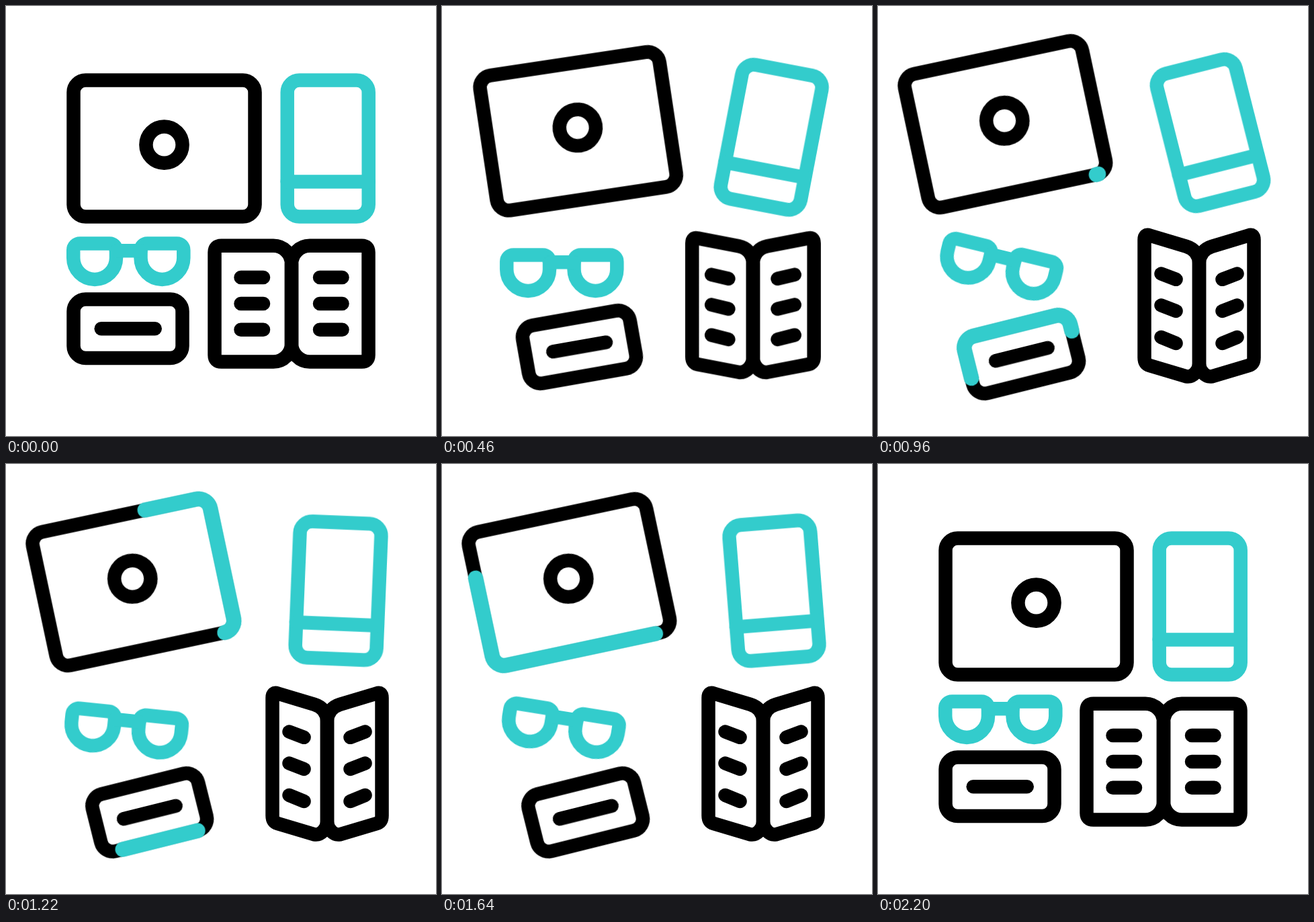
Recreate the animation shown at these times as an HTML page without scripts. Size 640 by 640 pixels, loop 2.4 s.

```html
<!DOCTYPE html>
<html lang="en">
<head>
<meta charset="utf-8">
<title>Desk items</title>
<style>
@property --tail { syntax: "<length>"; inherits: false; initial-value: 0px; }
@property --head { syntax: "<length>"; inherits: false; initial-value: 0px; }

html, body { margin: 0; width: 100%; height: 100%; overflow: hidden; background: #fff; }
svg { display: block; width: 100vw; height: 100vh; }

svg {
  --loop: 2400ms infinite;
  --soft: cubic-bezier(.333, 0, .667, 1);
  --ink: #000;
  --teal: #33cccc;
  fill: none;
  stroke: var(--ink);
  stroke-width: 20.5;
  stroke-linecap: round;
  stroke-linejoin: round;
}
.teal { stroke: var(--teal); }

/* Each item drifts out, waits, and drifts back. */
.item {
  --r: 0deg;
  animation: move var(--loop) cubic-bezier(.3, 0, .7, 1);
}
@keyframes move {
  0%, 8.333%, 91.667%, 100% { transform: translate(0px, 0px) rotate(0deg); }
  25%, 82.5% { transform: translate(var(--x), var(--y)) rotate(var(--r)); }
}
.laptop  { --x: -46.1px; --y: -36px; --r: -12deg; transform-origin: 235.5px 212px; }
.phone   { --x: 15.3px; --y: -23.4px; }
.glasses { --x: -5.6px; --y: 24px; }
.card    { --x: 32.2px; --y: 38.3px; --r: -14deg; transform-origin: 181.5px 480.3px; }
.book    { --x: 35.5px; --y: 20px; }

.swing { transform-origin: 479.2px 212px; animation: swing var(--loop) var(--soft); }
@keyframes swing {
  0%, 8.333%, 91.667%, 100% { transform: rotate(0deg); }
  25%, 58.333% { transform: rotate(15deg); }
  41.667%, 75% { transform: rotate(-15deg); }
}

.nod { transform-origin: 246px 395px; animation: nod var(--loop) var(--soft); }
@keyframes nod {
  0%, 25%, 58.333%, 91.667%, 100% { transform: rotate(0deg); }
  41.667%, 75% { transform: rotate(14deg); }
}

/* The book halves fold around the spine at x = 0. */
.spine { animation: spine var(--loop) var(--soft); }
@keyframes spine {
  0%, 8.333%, 91.667%, 100% { transform: translate(425px, 0px); }
  25%, 75% { transform: translate(442.5px, 0px); }
}
.half { animation: fold var(--loop) var(--soft); }
@keyframes fold {
  0%, 8.333%, 91.667%, 100% {
    d: path("M-104.5 356.8 L-27 356.8 C-12 356.8 0 369 0 384 L0 502.3 C0 517.3 -12 529.5 -27 529.5 L-104.5 529.5 Q-114.5 529.5 -114.5 519.5 L-114.5 366.8 Q-114.5 356.8 -104.5 356.8 Z M-75.5 404 L-42 404 M-75.5 443 L-42 443 M-75.5 481.8 L-42 481.8");
  }
  25%, 75% {
    d: path("M-73.5 321.5 L-19 337.9 C-9 341 0 349 0 363 L0 512 C0 523 -9.5 533 -19 531.3 L-73.5 515.2 Q-81.5 512.7 -81.5 503.5 L-81.5 328 Q-81.5 318.5 -73.5 321.5 Z M-56.5 378.5 L-34.5 386.8 M-56.5 425.5 L-34.5 434 M-56.5 473 L-34.5 482");
  }
}

/* A teal run travels once around an outline. */
.run {
  stroke: var(--teal);
  stroke-width: 22.5;
  opacity: 0;
  stroke-dasharray: calc(var(--head) - var(--tail)) 3000px;
  stroke-dashoffset: calc(0px - var(--tail));
}
.laptop .run {
  animation: head-l var(--loop) var(--soft), tail-l var(--loop) var(--soft), show-l var(--loop) step-end;
}
.card .run {
  animation: head-c var(--loop) var(--soft), tail-c var(--loop) var(--soft), show-c var(--loop) step-end;
}
@keyframes head-l { 0%, 38.96% { --head: 0px; } 70%, 100% { --head: 1000px; } }
@keyframes tail-l { 0%, 50.42% { --tail: 0px; } 82.71%, 100% { --tail: 1000px; } }
@keyframes show-l { 0% { opacity: 0; } 39.2% { opacity: 1; } 82.6%, 100% { opacity: 0; } }
@keyframes head-c { 0%, 25% { --head: 0px; } 50%, 100% { --head: 1000px; } }
@keyframes tail-c { 0%, 33.96% { --tail: 0px; } 58.96%, 100% { --tail: 1000px; } }
@keyframes show-c { 0% { opacity: 0; } 25.3% { opacity: 1; } 58.8%, 100% { opacity: 0; } }
</style>
</head>
<body>
<svg viewBox="0 0 640 640">
  <defs>
    <path id="lens" d="M110.2 353.4H154a10 10 0 0 1 10 10V375A31.9 31.9 0 0 1 100.2 375V363.4a10 10 0 0 1 10 -10Z"/>
  </defs>

  <g class="item laptop">
    <rect x="100.5" y="110.5" width="270" height="203" rx="18"/>
    <circle cx="235.5" cy="206.6" r="27.1"/>
    <path class="run" pathLength="1000" d="M352.5 313.5a18 18 0 0 0 18 -18v-167a18 18 0 0 0 -18 -18h-234a18 18 0 0 0 -18 18v167a18 18 0 0 0 18 18h234"/>
  </g>

  <g class="item phone teal">
    <g class="swing">
      <rect x="418.7" y="110.5" width="121" height="203" rx="18"/>
      <path d="M418.7 261.5h121"/>
    </g>
  </g>

  <g class="item glasses teal">
    <g class="nod">
      <use href="#lens"/>
      <use href="#lens" x="100.3"/>
      <path d="M164 364.2h36.5"/>
    </g>
  </g>

  <g class="item card">
    <rect x="100.5" y="436.5" width="162" height="87.5" rx="18"/>
    <path d="M141.7 480.3h80"/>
    <path class="run" pathLength="1000" d="M244.5 524a18 18 0 0 0 18 -18v-51.5a18 18 0 0 0 -18 -18h-126a18 18 0 0 0 -18 18v51.5a18 18 0 0 0 18 18h126"/>
  </g>

  <g class="item book">
    <g class="spine">
      <path class="half"/>
      <path class="half" transform="scale(-1 1)"/>
    </g>
  </g>
</svg>
</body>
</html>
```
